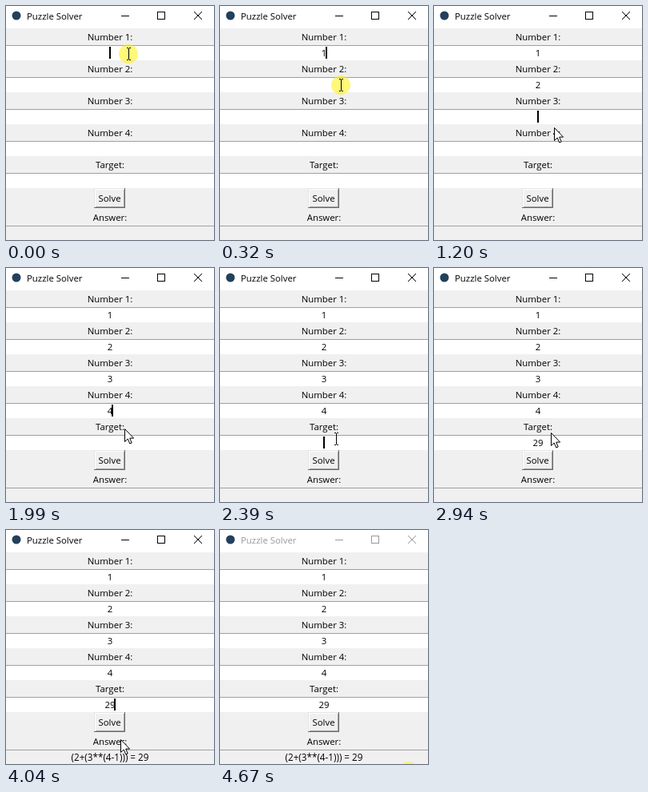
An HTML page for the animation above (4.75 s loop, 260 px wide and 293 px high).

```html
<!DOCTYPE html>
<html lang="en">
<head>
<meta charset="utf-8">
<title>Puzzle Solver</title>
<style>
html, body { margin: 0; width: 100%; height: 100%; overflow: hidden; background: #f0f0f0; }
svg { display: block; width: 260px; height: 293px; }
text { font: 11.4px "Open Sans", "Noto Sans", sans-serif; fill: #000; }
.mid { text-anchor: middle; }
.crisp { shape-rendering: crispEdges; }
</style>
</head>
<body>
<svg id="stage" viewBox="0 0 260 293" xmlns="http://www.w3.org/2000/svg"></svg>
<script>
const LOOP = 4750;
const ENTRY_TOP = [49, 89, 129, 169, 209];
const LABELS = ["Number 1:", "Number 2:", "Number 3:", "Number 4:", "Target:"];
const stage = document.getElementById("stage");

function add(tag, attrs, parent = stage, content) {
  const el = document.createElementNS("http://www.w3.org/2000/svg", tag);
  for (const key in attrs) el.setAttribute(key, attrs[key]);
  if (content) el.textContent = content;
  return parent.appendChild(el);
}
const rect = (x, y, width, height, fill, parent) =>
  add("rect", { x, y, width, height, fill, class: "crisp" }, parent);
const label = (y, content, parent) =>
  add("text", { x: 130, y, class: "mid" }, parent, content);
const show = (el, on) => el.setAttribute("visibility", on ? "visible" : "hidden");

// Latest entry of a time-ordered list of [time, ...values].
function at(list, t) {
  let hit = list[0];
  for (const item of list) if (item[0] <= t) hit = item;
  return hit;
}

// Window
rect(0, 0, 260, 293, "#f0f0f0");
rect(0, 0, 260, 28, "#fff");
add("circle", { cx: 13, cy: 12, r: 5.5, fill: "#23405c" });
const title = add("text", { x: 26, y: 17 }, stage, "Puzzle Solver");
const controls = add("g", { fill: "none", stroke: "#000" });
add("path", { d: "M144 12.5h10M189.5 7.5h9v9h-9z", class: "crisp" }, controls);
add("path", { d: "M235 7l10 10M245 7l-10 10" }, controls);

// Form
const fields = LABELS.map((name, i) => {
  const top = ENTRY_TOP[i];
  label(top - 6, name);
  rect(0, top, 260, 19, "#fff");
  rect(0, top, 260, 1, "#a0a0a0");
  return label(top + 14, "");
});
label(269, "Answer:");
rect(0, 275, 260, 1, "#a0a0a0");
const answer = label(289, "(2+(3**(4-1))) = 29");
answer.style.fontSize = "11.7px";
const caret = rect(0, 0, 2, 15, "#000");

// Button with a two-pixel bevel
function bevel(outerTop, innerTop, innerEnd, outerEnd) {
  const g = add("g", { fill: "none", class: "crisp" });
  const edge = (d, stroke) => add("path", { d, stroke }, g);
  edge("M110.5 253V228.5H149", outerTop);
  edge("M111.5 252V229.5H148", innerTop);
  edge("M112 251.5H147.5V230", innerEnd);
  edge("M110 252.5H148.5V228", outerEnd);
  return g;
}
const raised = bevel("#e3e3e3", "#fff", "#a0a0a0", "#696969");
const sunken = bevel("#a0a0a0", "#696969", "#e3e3e3", "#fff");
const solve = label(245, "Solve");
solve.setAttribute("x", 129.5);

// Pointer
const halo = add("circle", { r: 12, fill: "#fff200", "fill-opacity": 0.52 });
const arrow = add("path", {
  d: "M.5.5V16.5L4.2 13 6.8 19 9.2 18 6.7 12.1H11.6Z",
  fill: "#fff", stroke: "#000", "stroke-width": 1
});
const beam = add("path", {
  d: "M-2 -7.5H0M1 -7.5H3M.5 -7V7M-2 7.5H0M1 7.5H3",
  fill: "none", stroke: "#000", class: "crisp"
});

// [time, x, y, shape, pressed]
const MOUSE = [
  [0, 153, 60, "beam", 1], [80, 153, 60, "beam"], [160, 153, 65, "beam"],
  [240, 152, 80, "arrow"], [320, 151, 99, "beam", 1], [560, 151, 99, "beam"],
  [640, 151, 103, "beam"], [720, 152, 116, "arrow"], [800, 152, 131, "beam"],
  [880, 152, 136, "beam"], [960, 151, 139, "beam"], [1040, 151, 139, "beam", 1],
  [1120, 151, 142, "beam"], [1200, 150, 152, "arrow"], [1280, 150, 166, "arrow"],
  [1360, 150, 182, "beam"], [1510, 150, 183, "beam"], [1590, 150, 183, "beam", 1],
  [1830, 150, 184, "beam"], [1910, 149, 191, "arrow"], [1990, 148, 201, "arrow"],
  [2070, 146, 212, "beam"], [2150, 145, 214, "beam", 1], [2310, 145, 214, "beam"],
  [2470, 145, 211, "beam"], [2550, 146, 206, "arrow"], [3020, 147, 210, "beam"],
  [3100, 149, 220, "beam"], [3180, 151, 236, "arrow"], [3260, 150, 246, "arrow"],
  [3340, 142, 248, "arrow"], [3420, 134, 243, "arrow"], [3500, 132, 241, "arrow", 1],
  [3650, 132, 241, "arrow"], [4040, 143, 262, "arrow"], [4120, 236, 302, "none"],
  [4670, 236, 302, "none", 1]
];
// [time, focused row], -1 while blinked off
const FOCUS = [
  [0, 0], [560, 1], [1040, 2], [1590, 3], [2150, 4],
  [2780, -1], [3100, 4], [3650, -1], [4040, 4], [4590, -1]
];
const TYPED = [
  [[0, ""], [240, "1"]],
  [[0, ""], [640, "2"]],
  [[0, ""], [1280, "3"]],
  [[0, ""], [1830, "4"]],
  [[0, ""], [2470, "2"], [2780, "29"]]
];

function render(t) {
  const values = TYPED.map(list => at(list, t)[1]);
  fields.forEach((field, i) => {
    if (field.textContent !== values[i]) field.textContent = values[i];
  });

  const row = at(FOCUS, t)[1];
  show(caret, row >= 0);
  if (row >= 0) {
    caret.setAttribute("x", 129 + 3 * values[row].length);
    caret.setAttribute("y", ENTRY_TOP[row] + 2);
  }

  const [, x, y, shape, pressed] = at(MOUSE, t);
  for (const [name, el] of [["arrow", arrow], ["beam", beam]]) {
    show(el, shape === name);
    el.setAttribute("transform", `translate(${x} ${y})`);
  }
  show(halo, pressed);
  halo.setAttribute("cx", x);
  halo.setAttribute("cy", y);

  const down = t >= 3500 && t < 3650;
  show(raised, !down);
  show(sunken, down);
  solve.setAttribute("transform", down ? "translate(1 1)" : "");
  show(answer, t >= 3730);

  const ink = t >= 4670 ? "#999" : "#000";
  title.style.fill = ink;
  controls.setAttribute("stroke", ink);
}

const start = performance.now();
function tick() {
  render((performance.now() - start) % LOOP);
  requestAnimationFrame(tick);
}
render(0);
requestAnimationFrame(tick);
</script>
</body>
</html>
```
